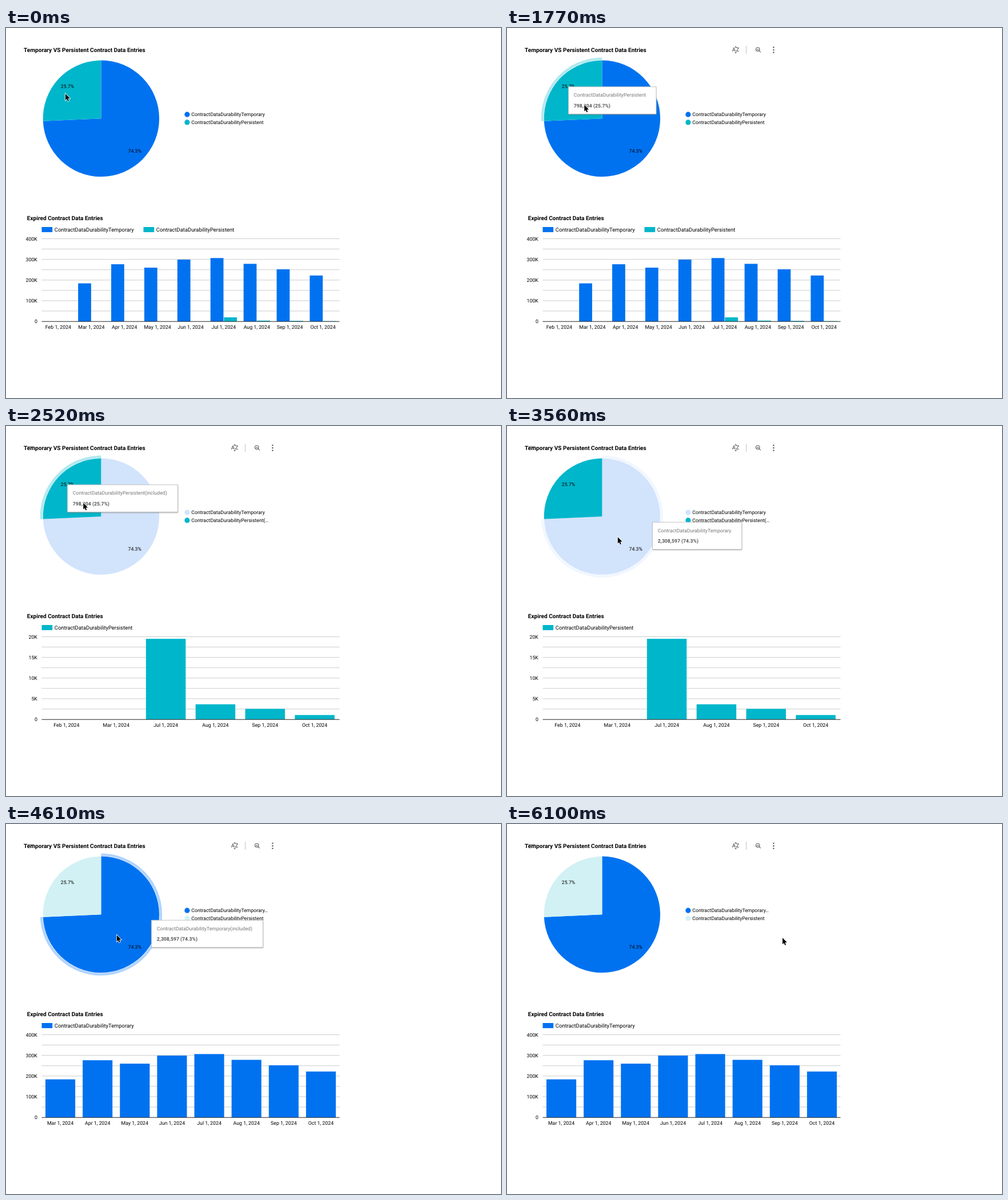
An HTML page with a canvas that plays this animation: 866 by 647 pixels, repeating every 6.25 s.

```html
<!DOCTYPE html>
<html lang="en">
<head>
<meta charset="utf-8">
<title>Contract data charts</title>
<style>
html, body { margin: 0; width: 100%; height: 100%; overflow: hidden; background: #fff; }
canvas { display: block; }
</style>
</head>
<body>
<canvas id="stage" width="866" height="647"></canvas>
<script>
const ctx = document.getElementById('stage').getContext('2d');
ctx.textRendering = 'geometricPrecision';

const LOOP = 6250;
const BLUE = '#0072f0', TEAL = '#00b6cb', GREY = '#5f6368';
const SMALL = 8.68, MEDIUM = 9.39, TITLE = 10.11;
const PIE = { x: 166.4, y: 158.3, r: 101.7 };
const PLOT = { left: 62.5, right: 583.5, top: 368.5, bottom: 513 };
const TURN = Math.PI * 2;

const SERIES = {
  temporary: {
    name: 'ContractDataDurabilityTemporary', color: BLUE, pale: '#d2e3fc',
    from: 0, to: 0.743, total: '2,308,597 (74.3%)', tip: [254.5, 168.2, 156.3, 195],
    first: 1, values: [0, 184, 276.5, 260, 299, 306.5, 278.5, 252, 222]
  },
  persistent: {
    name: 'ContractDataDurabilityPersistent', color: TEAL, pale: '#d2f1f4',
    from: 0.743, to: 1, total: '798,204 (25.7%)', tip: [107.5, 102.8, 153.5, 193],
    values: [0, 0, 0, 0, 0, 19.5, 3.65, 2.55, 1.05]
  }
};
const MONTHS = ['Feb', 'Mar', 'Apr', 'May', 'Jun', 'Jul', 'Aug', 'Sep', 'Oct'];
const CHARTS = {
  both: { keys: ['temporary', 'persistent'], months: [0, 1, 2, 3, 4, 5, 6, 7, 8], max: 400 },
  persistent: { keys: ['persistent'], months: [0, 1, 5, 6, 7, 8], max: 20 },
  temporary: { keys: ['temporary'], months: [1, 2, 3, 4, 5, 6, 7, 8], max: 400 }
};

// Each step: start time, then its values.
const POINTER = [
  [0, 104, 115, null],
  [140, 119, 118, 'persistent'], [290, 125, 118, 'persistent'],
  [590, 125, 119.5, 'persistent'], [730, 127, 138, 'persistent'],
  [880, 159, 195, 'temporary'], [1030, 183.5, 212.5, 'temporary'],
  [1180, 189, 215, 'temporary'], [1620, 169, 180, 'temporary'],
  [1770, 135.3, 134.5, 'persistent'], [3260, 150, 152, 'persistent'],
  [3410, 184, 186, 'temporary'], [3560, 193.8, 194.3, 'temporary'],
  [5950, 223, 192.5, 'temporary'], [6100, 482, 199, null]
];
const SELECTION = [[0, null, true], [2070, 'persistent', false], [2220, 'persistent', true],
  [4310, 'temporary', false], [4460, 'temporary', true]];
const CHART = [[0, 'both', 1], [2070, 'both', 0.28], [2220, 'persistent', 0.28],
  [2370, 'persistent', 0.7], [2520, 'persistent', 1], [4310, 'persistent', 0.18],
  [4460, 'temporary', 0.5], [4610, 'temporary', 1]];

const stepAt = (steps, t) => steps.filter(s => s[0] <= t).pop().slice(1);

function text(str, x, midY, { size = SMALL, color = '#000', align = 'left', weight = 400 } = {}) {
  ctx.font = `${weight} ${size}px Roboto, sans-serif`;
  ctx.textAlign = align;
  ctx.fillStyle = color;
  ctx.fillText(str, x, midY + size * 0.355);
}

function rect(x, y, w, h, color) {
  ctx.fillStyle = color;
  ctx.fillRect(x, y, w, h);
}

function disc(x, y, r, color) {
  ctx.fillStyle = color;
  ctx.beginPath();
  ctx.arc(x, y, r, 0, TURN);
  ctx.fill();
}

function polygon(points, color) {
  ctx.fillStyle = color;
  ctx.beginPath();
  points.forEach(([x, y]) => ctx.lineTo(x, y));
  ctx.closePath();
  ctx.fill();
}

function line(x1, y1, x2, y2, color, width) {
  ctx.strokeStyle = color;
  ctx.lineWidth = width;
  ctx.beginPath();
  ctx.moveTo(x1, y1);
  ctx.lineTo(x2, y2);
  ctx.stroke();
}

const shade = (key, selected) =>
  selected && selected !== key ? SERIES[key].pale : SERIES[key].color;

function drawPie(selected, hover) {
  for (const key of ['temporary', 'persistent']) {
    const { from, to } = SERIES[key];
    const a = (from - 0.25) * TURN, b = (to - 0.25) * TURN;
    ctx.fillStyle = ctx.strokeStyle = shade(key, selected);
    ctx.beginPath();
    ctx.moveTo(PIE.x, PIE.y);
    ctx.arc(PIE.x, PIE.y, PIE.r, a, b);
    ctx.fill();
    if (key !== hover) continue;
    ctx.globalAlpha = 0.3;
    ctx.lineWidth = 4.5;
    ctx.beginPath();
    ctx.arc(PIE.x, PIE.y, PIE.r + 2.8, a, b);
    ctx.stroke();
    ctx.globalAlpha = 1;
  }
  text('25.7%', 107.5, 102.4, { align: 'center' });
  text('74.3%', 225.2, 215, { align: 'center' });
}

function drawPieLegend(selected) {
  ['temporary', 'persistent'].forEach((key, i) => {
    const y = 151.2 + i * 13.7;
    const suffix = selected !== key ? '' : key === 'persistent' ? '(…' : '…';
    disc(316.9, y, 4.6, shade(key, selected));
    text(SERIES[key].name + suffix, 324.3, y);
  });
}

function drawToolbar() {
  text('A', 393.8, 38, { size: 9.6, color: GREY, weight: 500 });
  text('Z', 400.4, 38, { size: 9.6, color: GREY, weight: 500 });
  polygon([[398, 34], [402.2, 34], [400.1, 31.8]], GREY);
  polygon([[398, 42.3], [402.2, 42.3], [400.1, 44.5]], GREY);
  line(418.5, 31, 418.5, 45, '#bdc1c6', 1);
  ctx.strokeStyle = GREY;
  ctx.lineWidth = 1.1;
  ctx.beginPath();
  ctx.arc(438.7, 37.3, 3.3, 0, TURN);
  ctx.stroke();
  line(441, 39.6, 443.8, 42.4, GREY, 1.3);
  [[437.2, 37.2], [438.7, 36], [440.2, 36.8]].forEach(([x, y]) => line(x, y, x, 39, GREY, 0.8));
  [33.8, 38.3, 42.8].forEach(y => disc(466.4, y, 1.3, GREY));
}

function drawFilterMark() {
  [[37.5, 49.5, 36], [39.5, 47.5, 38.5], [42, 45, 41]]
    .forEach(([x1, x2, y]) => line(x1, y, x2, y, GREY, 1));
}

function drawBars(name, opacity) {
  const { keys, months, max } = CHARTS[name];
  const { left, right, top, bottom } = PLOT;
  const height = bottom - top;

  let legendX = left;
  keys.forEach(key => {
    rect(legendX, 348, 18.7, 9, SERIES[key].color);
    text(SERIES[key].name, legendX + 22.3, 352.6, { size: MEDIUM });
    legendX += 178;
  });

  for (let i = 0; i < 8; i++) {
    const y = top + height * i / 8;
    line(left, y, right, y, '#ccc', 1);
    if (i % 2 === 0) text(max * (1 - i / 8) + 'K', 54.8, y + 0.2, { align: 'right', size: 8.75 });
  }
  text('0', 54.8, bottom + 0.2, { align: 'right', size: 8.75 });

  const slot = (right - left) / months.length;
  const group = slot * 0.8;
  const gap = keys.length > 1 ? 0.8 : 0;
  const barWidth = (group - gap) / keys.length;
  months.forEach((m, i) => {
    const center = left + slot * (i + 0.5);
    keys.forEach((key, k) => {
      const h = SERIES[key].values[m] / max * height;
      rect(center - group / 2 + k * (barWidth + gap), bottom - h, barWidth, h, SERIES[key].color);
    });
    text(MONTHS[m] + ' 1, 2024', center, 522.8, { align: 'center', size: 8.8 });
  });
  line(left, bottom + 0.2, right, bottom + 0.2, '#222', 1);

  if (opacity < 1) rect(30, 345, 560, 190, `rgba(255,255,255,${1 - opacity})`);
}

function drawTooltip(key, included) {
  const { name, total, tip: [x, y, normal, wide] } = SERIES[key];
  const w = included ? wide : normal, h = 47.5;
  ctx.save();
  ctx.shadowColor = 'rgba(120,120,120,0.6)';
  ctx.shadowBlur = 2;
  ctx.shadowOffsetY = 1.4;
  rect(x, y, w, h, '#fff');
  ctx.restore();
  ctx.strokeStyle = '#bdbdbd';
  ctx.lineWidth = 0.9;
  ctx.strokeRect(x, y, w, h);
  text(name + (included ? '(included)' : ''), x + 9.3, y + 14.4, { color: '#757575' });
  text(total, x + 9.3, y + 33, { color: '#555', weight: 700 });
}

function drawCursor(x, y) {
  const shape = [[0, 0], [0, 11.2], [2.5, 8.9], [4.2, 12.9], [6, 12.1], [4.3, 8.3], [7.8, 8]]
    .map(([dx, dy]) => [x + dx, y + dy]);
  ctx.beginPath();
  shape.forEach(([px, py]) => ctx.lineTo(px, py));
  ctx.closePath();
  ctx.strokeStyle = '#fff';
  ctx.lineWidth = 1.6;
  ctx.stroke();
  polygon(shape, '#000');
}

function draw(t) {
  const [x, y, hover] = stepAt(POINTER, t);
  const [selected, settled] = stepAt(SELECTION, t);
  rect(0, 0, 866, 647, '#fff');
  text('Temporary VS Persistent Contract Data Entries', 31, 38.1, { size: TITLE, weight: 700 });
  text('Expired Contract Data Entries', 36.7, 332.1, { size: TITLE, weight: 700 });
  if (t >= 140) drawToolbar();
  if (selected) drawFilterMark();
  drawPie(selected, settled ? hover : null);
  drawPieLegend(selected);
  drawBars(...stepAt(CHART, t));
  if (hover) drawTooltip(hover, settled && hover === selected);
  drawCursor(x, y);
}

function frame() {
  draw(performance.now() % LOOP);
  requestAnimationFrame(frame);
}
frame();
</script>
</body>
</html>
```
